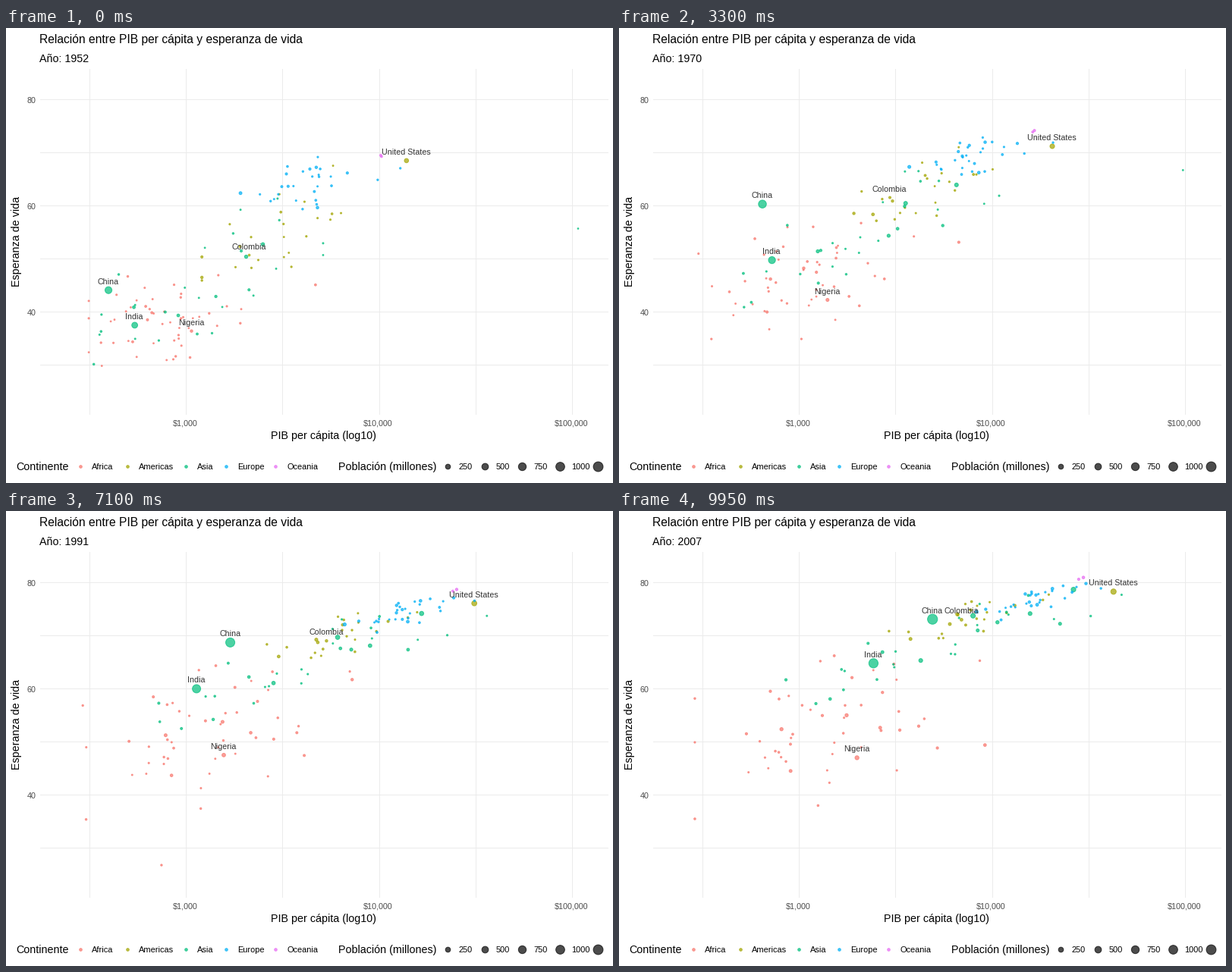
Write a matplotlib script that moves like this. It is 800x600 px and loops after 10 s.

```python
import numpy as np
import matplotlib.pyplot as plt
from matplotlib.animation import FuncAnimation

W, H, DPI = 800, 600, 100
FRAMES, INTERVAL = 200, 50
FIRST, LAST = 1952, 2007
PT = 72 / DPI                   # points per pixel

COLORS = {"Africa": "#F8766D", "Americas": "#A3A500", "Asia": "#00BF7D",
          "Europe": "#00B0F6", "Oceania": "#E76BF3"}

# Crowd rules. first/last: log income mean and spread, life mean,
# life gained per tenfold income, life spread.
# pop: last median in millions, log spread, first/last ratio.
# pace: ease-out power of income and of life.
CROWDS = {
    "Africa": dict(count=49, first=(2.95, .25, 39.3, 4, 4.6), last=(3.22, .42, 55, 8, 7.5),
                   pop=(10, 1.1, .27), pace=(1.6, 2)),
    "Americas": dict(count=23, first=(3.5, .23, 53.5, 20, 5.5), last=(3.92, .25, 73.4, 10, 2),
                     pop=(9, 1.2, .38), pace=(1.3, 1.4)),
    "Asia": dict(count=29, first=(3.12, .33, 46.5, 14, 6.5), last=(3.8, .48, 70.7, 11, 3.5),
                 pop=(20, 1.3, .37), pace=(1.3, 1.4)),
    "Europe": dict(count=30, first=(3.7, .23, 64.8, 14, 2.8), last=(4.31, .22, 77.6, 10, 1),
                   pop=(10, 1.1, .72), pace=(1.5, 1.3)),
    "Oceania": dict(count=2, first=(4.01, .01, 69.2, 5, .2), last=(4.46, .07, 80.7, 5, .2),
                    pop=(9, .8, .48), pace=(1.5, 1.3)),
}

# Own paths: continent, population range, key points (year, income, life)
LABELLED = {
    "China": ("Asia", (556, 1319),
              [(1952, 400, 44), (1957, 576, 50.5), (1962, 488, 44.5), (1967, 613, 58.4),
               (1977, 741, 64), (1987, 1379, 67.3), (1997, 2289, 70.4), (2002, 3119, 72),
               (2007, 4959, 73)]),
    "India": ("Asia", (372, 1110),
              [(1952, 547, 37.4), (1977, 813, 54.2), (1992, 1164, 60.2),
               (2002, 1747, 62.9), (2007, 2452, 64.7)]),
    "Nigeria": ("Africa", (33, 135),
                [(1952, 1077, 36.3), (1967, 1015, 41), (1972, 1698, 42.8), (1977, 1982, 44.5),
                 (1987, 1385, 46.9), (1992, 1620, 47.5), (2002, 1615, 46.6),
                 (2007, 2014, 46.9)]),
    "United States": ("Americas", (157, 301),
                      [(1952, 13990, 68.4), (1962, 16173, 70.2), (1972, 21806, 71.3),
                       (1982, 25010, 74.7), (1992, 32004, 76.1), (2007, 42952, 78.2)]),
    "Colombia": ("Americas", (12, 44),
                 [(1952, 2144, 50.6), (1967, 2679, 60), (1982, 4398, 66.7),
                  (1997, 6117, 70.3), (2002, 5755, 71.7), (2007, 7007, 72.9)]),
}
STRAYS = [
    ("Asia", (.2, 2.5), [(1952, 108382, 55.6), (1967, 80895, 64.6), (1972, 109348, 67.7),
                         (1982, 31354, 71.3), (2007, 47307, 77.6)]),
    ("Asia", (4.7, 14), [(1952, 368, 39.4), (1967, 523, 45.4), (1977, 525, 31.2),
                         (1982, 624, 51), (2002, 896, 56.8), (2007, 1714, 59.7)]),
    ("Africa", (2.5, 9), [(1952, 493, 40), (1982, 882, 46.2), (1987, 848, 44),
                          (1992, 737, 23.6), (1997, 590, 36.1), (2007, 863, 46.2)]),
    ("Africa", (14, 44), [(1952, 4725, 45), (1982, 8568, 58.2), (1992, 7225, 61.9),
                          (2007, 9270, 49.3)]),
]


def to_x(log_income):
    return 236.3 + 254.4 * (np.asarray(log_income) - 3)


def to_y(life):
    return 93.7 + 7 * (80 - np.asarray(life))


def radius(pop):
    return 1.3 + 5.8 * np.sqrt(np.asarray(pop) / 1319)


def marker_area(r):
    return (2 * (np.asarray(r) - .5) * PT) ** 2


def ease_out(t, power):
    return 1 - (1 - t) ** power


def mix(pair, t):
    return pair[0] + (pair[1] - pair[0]) * t


def make_crowd(rng, rule):
    """First and last (log income, life, radius) of every dot in a continent."""
    noise = rng.normal(size=(5, rule["count"])).clip(-1.8, 1.8)
    ends = []
    for state, keep in ((rule["first"], 1), (rule["last"], .75)):
        mean, spread, life, slope, scatter = state
        drift = np.sqrt(1 - keep ** 2)
        rich = spread * (keep * noise[0] + drift * noise[1]).clip(-1.8, 1.8)
        healthy = scatter * (keep * noise[2] + drift * noise[3])
        ends.append((mean + rich, np.minimum(life + slope * rich + healthy, 82.5)))
    median, spread, ratio = rule["pop"]
    pop = median * np.exp(spread * noise[4])
    return [np.array([*end, radius(p)]) for end, p in zip(ends, (pop * ratio, pop))]


def crowd_at(ends, pace, t):
    return mix(ends, np.array([[ease_out(t, p)] for p in (*pace, 1)]))


def path_at(pops, points, t):
    years, income, life = np.transpose(points)
    year = mix((FIRST, LAST), t)
    return (np.interp(year, years, np.log10(income)), np.interp(year, years, life),
            mix(radius(pops), t))


rng = np.random.default_rng(7)
crowds = [(make_crowd(rng, rule), rule["pace"]) for rule in CROWDS.values()]
paths = list(LABELLED.values()) + STRAYS
dot_colors = [COLORS[continent] for continent, _, _ in paths]
for name, rule in CROWDS.items():
    dot_colors += [COLORS[name]] * rule["count"]


def pose_at(t):
    own = np.transpose([path_at(pops, points, t) for _, pops, points in paths])
    log_income, life, r = np.hstack([own] + [crowd_at(*crowd, t) for crowd in crowds])
    return to_x(log_income), to_y(life), r


plt.rcParams["font.family"] = "Liberation Sans"
fig = plt.figure(figsize=(W / DPI, H / DPI), dpi=DPI, facecolor="white")
ax = fig.add_axes([0, 0, 1, 1])
ax.set_xlim(0, W)
ax.set_ylim(H, 0)
ax.axis("off")


def put(x, y, text, size=14.2, color="black", **kw):
    return ax.text(x, y, text, fontsize=size * PT, color=color, va="baseline", **kw)


def dots(x, y, r, colors):
    return ax.scatter(x, y, s=marker_area(r), c=colors, edgecolors=colors,
                      alpha=.7, linewidths=PT, zorder=3)


# Grid and axes
for i in range(6):
    gx, gy = round(109 + 127.2 * i) + .5, 93.5 + 70 * i
    ax.plot([gx, gx], [54, 509], color="#EBEBEB", lw=PT, zorder=1)
    ax.plot([45, 793], [gy, gy], color="#EBEBEB", lw=PT, zorder=1)
for power in (3, 4, 5):
    put(to_x(power) - .5, 525, f"${10 ** power:,}", 10.8, "#4D4D4D", ha="center")
for life in (40, 60, 80):
    put(39.5, to_y(life) + 5, str(life), 10.8, "#4D4D4D", ha="right")
put(418.5, 542, "PIB per cápita (log10)", ha="center")
put(18, 281, "Esperanza de vida", ha="center", rotation=90, rotation_mode="anchor")
put(44.5, 20, "Relación entre PIB per cápita y esperanza de vida", 15.6)
subtitle = put(44.5, 45, "")

# Legends
put(13.5, 583, "Continente")
for name, dot_x in zip(COLORS, (98, 160, 237, 290, 355)):
    dots([dot_x], [577.5], [2.3], [COLORS[name]])
    put(dot_x + 15.3, 582, name, 11)
put(438, 583, "Población (millones)")
for i in range(5):
    pop, dot_x = 250 * (i + 1), 581.5 + 49.4 * i + .3 * (i == 4) * i
    dots([dot_x], [577.5], [radius(pop)], ["black"])
    if pop <= 1000:
        put(dot_x + 15, 582, str(pop), 11)

cloud = dots(*pose_at(0), dot_colors)
labels = [put(0, 0, name, 10.6, "#333333", ha="center", zorder=4) for name in LABELLED]


def draw(frame):
    t = frame / (FRAMES - 1)
    x, y, r = pose_at(t)
    cloud.set_offsets(np.column_stack([x, y]))
    cloud.set_sizes(marker_area(r))
    for label, lx, ly in zip(labels, x, y):
        label.set_position((lx - .5, ly - 8))
    subtitle.set_text(f"Año: {round(mix((FIRST, LAST), t))}")
    return [cloud, subtitle, *labels]


anim = FuncAnimation(fig, draw, frames=FRAMES, interval=INTERVAL, repeat=True)
plt.show()
```
